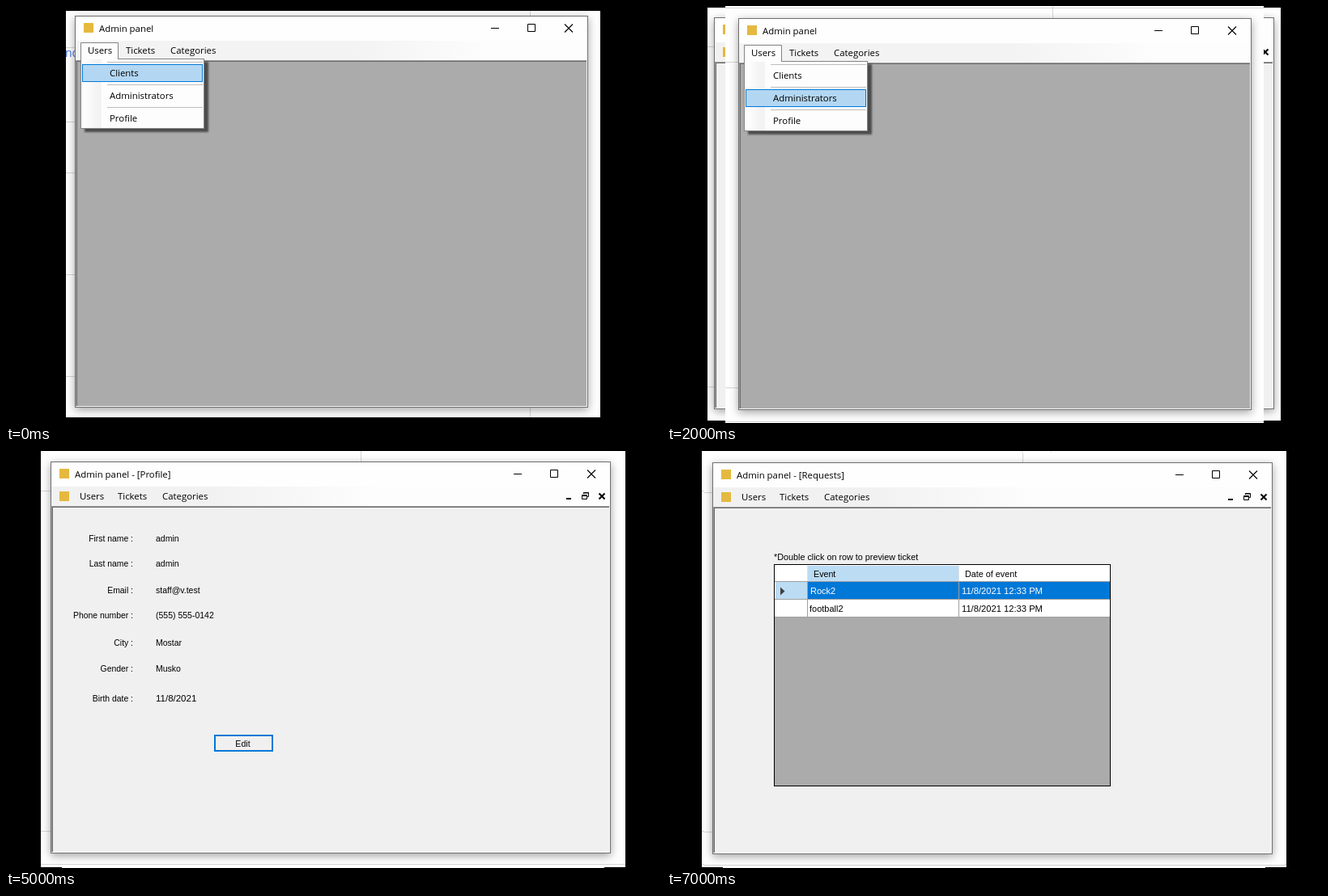
Animation of 809x516 px, one loop 8 s. Source, as an HTML page:

```html
<!DOCTYPE html>
<html lang="en">
<head>
<meta charset="utf-8">
<title>Admin panel</title>
<style>
  html, body { margin: 0; width: 100%; height: 100%; overflow: hidden; background: #000; }
  #stage { display: block; width: 809px; height: 516px; }
  text { white-space: pre; }
  .ui { font: 11.4px "Open Sans", "Noto Sans", sans-serif; }
  .form { font-family: "Liberation Sans", Arial, sans-serif; }
</style>
</head>
<body>
<svg id="stage" viewBox="0 0 809 516" xmlns="http://www.w3.org/2000/svg">
  <defs>
    <filter id="glow" x="-10%" y="-10%" width="120%" height="120%">
      <feDropShadow dx="0" dy="3" stdDeviation="5.5" flood-color="#000" flood-opacity=".36"/>
    </filter>
    <filter id="soft"><feGaussianBlur stdDeviation="1"/></filter>
    <linearGradient id="barNormal">
      <stop offset=".54" stop-color="#f3f3f3"/><stop offset=".82" stop-color="#fdfdfd"/>
    </linearGradient>
    <linearGradient id="barMax">
      <stop offset=".28" stop-color="#f1f1f1"/><stop offset=".58" stop-color="#fdfdfd"/>
    </linearGradient>
    <linearGradient id="gutter">
      <stop offset=".2" stop-color="#fdfdfd"/><stop offset=".75" stop-color="#f3f3f3"/>
    </linearGradient>
  </defs>
</svg>
<script>
const STEP = 1000, HEIGHT = 485;
const BLUE = '#0078d7', PALE = '#bcdcf4', GRAY = '#ababab', FACE = '#f0f0f0';

const box = (x, y, w, h, fill, extra = '') =>
  `<rect x="${x}" y="${y}" width="${w}" height="${h}" fill="${fill}" ${extra}/>`;
const framed = (x, y, w, h, fill, stroke) =>
  box(x + .5, y + .5, w - 1, h - 1, fill, `stroke="${stroke}"`);
const path = (d, color = '#000', width = 1) =>
  `<path d="${d}" fill="none" stroke="${color}" stroke-width="${width}"/>`;
const label = (x, y, s) => `<text class="ui" x="${x}" y="${y}">${s}</text>`;
const formText = (x, y, s, size = 10.4, extra = '') =>
  `<text class="form" x="${x}" y="${y}" font-size="${size}" ${extra}>${s}</text>`;
const icon = (x, y) => box(x, y, 12, 12, '#e5b93f');

const MENUS = {
  Users: { x: 7, tab: 47, w: 153, items: ['Clients', 'Administrators', 'Profile'] },
  Tickets: { x: 54, tab: 55, w: 164, items: ['Requests', 'Active tickets', 'History of selling'] }
};

// Opened menu, relative to the window corner
function dropdown({ x, tab, w, items }, active) {
  const top = 53, h = 87;
  let s = box(x + 5, top + 4, w, h, '#000', 'opacity=".55" filter="url(#soft)"');
  s += framed(x, top, w, h, '#fdfdfd', '#858585');
  s += box(x + 1, top + 1, 25, h - 2, 'url(#gutter)');
  s += box(x + 1, 34, tab - 2, 20, '#fdfdfd');
  s += path(`M${x + .5} 54V33.5h${tab - 1}V54`, '#858585');
  items.forEach((name, i) => {
    const y = 57 + i * 28;
    s += box(x + 33, y, w - 35, 1, '#bdbdbd');
    if (i === active) s += framed(x + 2, y + 3, w - 4, 22, '#b3d7f3', BLUE);
    s += label(x + 36, y + 18, name);
  });
  return s;
}

function captionButtons(w) {
  return path(`M${w - 120} 15.5h10`) +
    path(`M${w - 74.5} 10.5h9v9h-9z`) +
    path(`M${w - 29} 10.5l10 10m0 -10l-10 10`, '#000', 1.1);
}

function childButtons(w) {
  return path(`M${w - 55} 46h6`, '#000', 2) +
    path(`M${w - 33.5} 40v-1.5h6v5h-2M${w - 34} 39h7`) +
    path(`M${w - 35.5} 41.5h6v5h-6zM${w - 36} 42.5h7`) +
    path(`M${w - 14.5} 39.5l7 7m0 -7l-7 7`, '#000', 2);
}

function appWindow({ x, y, child, menu, active }) {
  const w = child ? 692 : 634, shift = child ? 20 : 0;
  let s = box(0, 0, w, HEIGHT, '#fff', 'filter="url(#glow)"');
  s += framed(0, 0, w, HEIGHT, '#fefefe', '#707070');
  s += icon(11, 9) + label(30, 20, 'Admin panel' + (child ? ` - [${child}]` : ''));
  s += captionButtons(w);
  s += box(1, 31, w - 2, 24, `url(#bar${child ? 'Max' : 'Normal'})`);
  if (child) s += icon(11, 37) + childButtons(w);
  // sunken client area
  s += box(1, 55, w - 2, HEIGHT - 56, '#f8f8f8');
  s += box(1, 55, w - 3, HEIGHT - 57, '#a0a0a0');
  s += box(2, 56, w - 4, HEIGHT - 58, '#696969');
  s += box(3, 57, w - 5, HEIGHT - 59, child ? FACE : GRAY);
  if (menu) s += dropdown(MENUS[menu], active);
  [['Users', 16], ['Tickets', 63], ['Categories', 118]].forEach(([name, tx]) => {
    s += label(tx + shift, 47, name);
  });
  return `<g transform="translate(${x} ${y})">${s}</g>`;
}

function profile() {
  const rows = [
    ['First name', 'admin', 112], ['Last name', 'admin', 143],
    ['Email', 'staff@v.test', 176], ['Phone number', '(555) 555-0142', 207],
    ['City', 'Mostar', 241], ['Gender', 'Musko', 273], ['Birth date', '11/8/2021', 310]
  ];
  let s = rows.map(([name, value, y]) =>
    formText(157, y, name + ' :', 10.4, 'text-anchor="end"') +
    formText(185, y, value, value.includes('/') ? 11.5 : 10.5)).join('');
  s += box(258, 352, 71, 19, FACE, `stroke="${BLUE}" stroke-width="2"`);
  return s + formText(292.5, 366, 'Edit', 10.6, 'text-anchor="middle"');
}

function requests() {
  const rows = ['Rock2', 'football2'], date = '11/8/2021 12:33 PM';
  let s = formText(132, 135, '*Double click on row to preview ticket', 10.8);
  s += framed(132, 140, 416, 275, GRAY, '#000');
  s += box(133, 141, 414, 65, '#fff');
  s += box(174, 142, 186, 19, PALE) + box(134, 162, 39, 21, PALE);
  s += box(174, 162, 373, 21, BLUE);
  [161, 183, 205].forEach(y => { s += box(133, y, 414, 1, '#a0a0a0'); });
  s += box(173, 162, 1, 44, '#a0a0a0') + box(360, 162, 1, 44, '#a0a0a0');
  s += box(173, 142, 1, 19, '#e2e2e2') + box(360, 142, 1, 19, '#e2e2e2');
  s += formText(181, 156, 'Event', 10.7) + formText(368, 156, 'Date of event', 10.8);
  rows.forEach((name, i) => {
    const y = 177 + i * 22, fill = `fill="${i ? '#000' : '#fff'}"`;
    s += formText(177 - i, y, name, 11, fill) + formText(364, y, date, 11.2, fill);
  });
  return s + '<path d="M140 168.5v10l5.5 -5z" fill="#404040"/>';
}

// area: left, top, right, bottom; rules: page lines behind the window
const scenes = [
  { area: [74, 6, 734, 509], x: 85, y: 12, menu: 'Users', active: 0,
    rules: [51, 143, 206, 332, 458], v: 647, fullV: true,
    back: '<text class="ui" x="73" y="63" style="font-size:14px" fill="#3d6fd6">nc</text>' },
  { area: [50, 2, 758, 513], x: 58, y: 14, child: 'Clients', rules: [50, 471], v: 440 },
  { area: [72, 0, 737, 516], x: 88, y: 15, menu: 'Users', active: 1,
    rules: [69, 472], v: 476, across: [2, 514] },
  { area: [48, 3, 761, 513], x: 57, y: 15, child: 'Administrators', rules: [52, 472], v: 440 },
  { area: [69, 0, 739, 516], x: 86, y: 12, menu: 'Users', active: 2,
    rules: [66, 469], v: 474, across: [510] },
  { area: [43, 0, 765, 515], x: 55, y: 13, child: 'Profile', body: profile,
    rules: [49, 470], v: 438, across: [511] },
  { area: [75, 1, 734, 513], x: 86, y: 14, menu: 'Tickets', active: 0,
    rules: [67, 471], v: 474, across: [512] },
  { area: [46, 2, 763, 513], x: 56, y: 14, child: 'Requests', body: requests,
    rules: [51, 471], v: 439, across: [512] }
];

function layer(sc) {
  const [l, t, r, b] = sc.area, w = r - l, h = b - t, line = '#d5d5d5';
  let s = box(l, t, w, h, '#fefefe');
  sc.rules.forEach(y => { s += box(l, y, 40, 1, line); });
  (sc.across || []).forEach(y => { s += box(l, y, w, 1, line); });
  s += box(sc.v, t, 1, sc.fullV ? h : 20, line);
  s += (sc.back || '') + appWindow(sc) + (sc.body ? sc.body() : '');
  return `<svg class="layer" x="${l}" y="${t}" width="${w}" height="${h}" ` +
    `viewBox="${l} ${t} ${w} ${h}" overflow="hidden">${s}</svg>`;
}

const stage = document.getElementById('stage');
stage.insertAdjacentHTML('beforeend', scenes.map(layer).join(''));
const layers = [...stage.querySelectorAll('.layer')];

// Each scene is laid over the ones before it, so their edges stay visible
function render(ms) {
  const now = Math.floor(ms / STEP) % scenes.length;
  layers.forEach((el, i) => { el.style.display = i <= now ? '' : 'none'; });
}

const start = performance.now();
function tick() {
  render(performance.now() - start);
  requestAnimationFrame(tick);
}
render(0);
requestAnimationFrame(tick);
</script>
</body>
</html>
```
